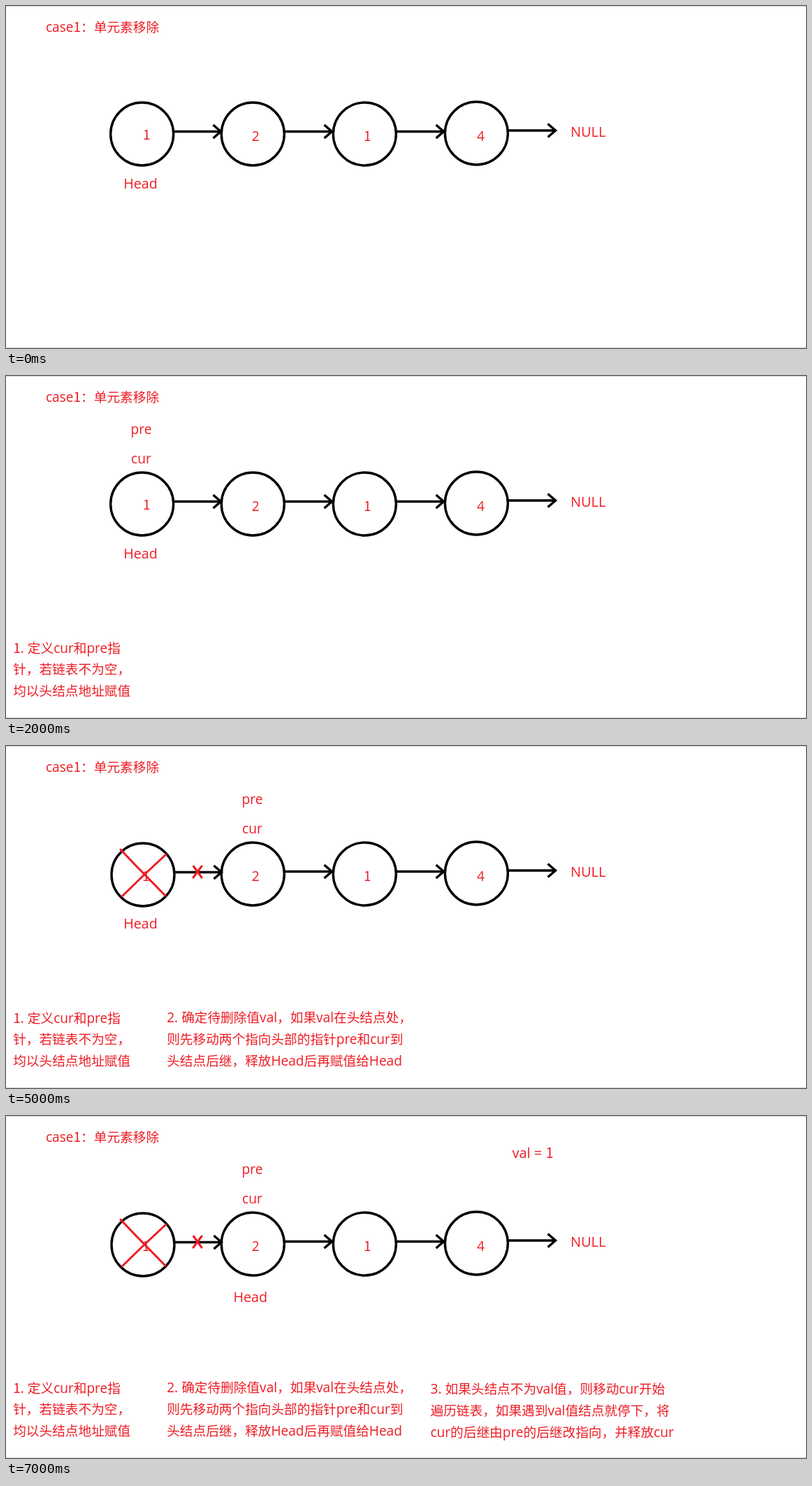
An HTML page for the animation above (8000 ms loop, 1145 by 489 pixels).

```html
<!DOCTYPE html>
<html lang="zh-CN">
<head>
<meta charset="utf-8">
<title>单元素移除</title>
<style>
html, body { margin: 0; width: 100%; height: 100%; overflow: hidden; background: #fff; }
svg { display: block; width: 100%; height: 100%; }
text { fill: #ed1c24; font: 18.67px "Open Sans", "Noto Sans CJK SC", "Noto Sans CJK", sans-serif; white-space: pre; }
.latin { font-size: 1.023em; }
.one { font-family: "Noto Sans CJK SC", "Noto Sans CJK", sans-serif; }
.ink { fill: none; stroke: #000; stroke-width: 3.4; }
.cross { fill: none; stroke: #ed1c24; stroke-width: 3; stroke-linecap: round; }
.edge { fill: #d6d6d6; }
</style>
</head>
<body>
<svg id="stage" viewBox="0 0 1145 489" xmlns="http://www.w3.org/2000/svg"></svg>
<script>
const LOOP = 8000;

// Latin runs are set slightly larger; the digit 1 takes the footed form.
const mark = s => s.replace(/[\x20-\x7e]+/g, run =>
  `<tspan class="latin">${run.replace(/1/g, '<tspan class="one">1</tspan>')}</tspan>`);

const text = (x, y, s, size = 18.67, anchor = 'start') =>
  `<text x="${x}" y="${y}" text-anchor="${anchor}" style="font-size:${size}px">${mark(s)}</text>`;

const note = (x, y, lines) =>
  lines.map((s, i) => text(x, y + i * 30.8, s)).join('');

const circle = (x, y) => `<circle class="ink" cx="${x}" cy="${y}" r="45"/>`;
const value = (x, y, s) => text(x, y, s, 18.67, 'middle');
const arrow = (x, y, end) =>
  `<path class="ink" d="M${x} ${y}H${end}M${end - 11} ${y - 9.5}L${end} ${y}L${end - 11} ${y + 9.5}"/>`;
const cross = d => `<path class="cross" d="${d}"/>`;
const pointers = x => text(x, 83, 'pre', 18.8) + text(x + 0.5, 125, 'cur', 18.8);

const base =
  '<rect class="edge" width="1145" height="1"/><rect class="edge" y="488" width="1145" height="1"/>' +
  text(57, 37, 'case1：单元素移除') +
  circle(353.3, 183) + value(357.3, 192.5, '2') + arrow(398, 179.5, 466.5) +
  circle(513.3, 183) + value(517.3, 192.5, '1') + arrow(558, 179.5, 626.5) +
  circle(673.3, 182) + value(679.5, 192.5, '4') + arrow(718, 178, 786.5) +
  text(808, 187, 'NULL', 19.5);

// [from ms, to ms, content]
const steps = [
  [0, LOOP, base],
  [0, 3000, circle(194.7, 183) + value(201.3, 191, '1') + arrow(239.5, 179.5, 307.5)],
  [3000, LOOP, circle(196, 184) + value(200.3, 193, '1') + arrow(241, 180.5, 308.5)],
  [0, 6000, text(168.2, 261, 'Head', 19.3)],
  [6000, LOOP, text(325.4, 266, 'Head', 19.3)],
  [1000, LOOP, note(10.2, 395.5, ['1. 定义cur和pre指', '针，若链表不为空，', '均以头结点地址赋值'])],
  [2000, 4000, pointers(178.5)],
  [4000, LOOP, pointers(337.6)],
  [3000, LOOP, note(230.2, 395, [
    '2. 确定待删除值val，如果val在头结点处，',
    '则先移动两个指向头部的指针pre和cur到',
    '头结点后继，释放Head后再赋值给Head'])],
  [5000, LOOP,
    cross('M164 148L182 167L228 214M229 155L199 183L166 215') +
    cross('M268.5 172L280 188M280 172L268 188')],
  [7000, LOOP, text(724.5, 59.5, 'val = 1', 19.5) + note(607.5, 397, [
    '3. 如果头结点不为val值，则移动cur开始',
    '遍历链表，如果遇到val值结点就停下，将',
    'cur的后继由pre的后继改指向，并释放cur'])]
];

const stage = document.getElementById('stage');
stage.innerHTML = steps.map(s => `<g>${s[2]}</g>`).join('');
const groups = [...stage.children];

function draw(now) {
  const t = now % LOOP;
  steps.forEach(([from, to], i) => {
    groups[i].style.display = t >= from && t < to ? '' : 'none';
  });
}

let start;
function tick(now) {
  start ??= now;
  draw(now - start);
  requestAnimationFrame(tick);
}
draw(0);
requestAnimationFrame(tick);
</script>
</body>
</html>
```
